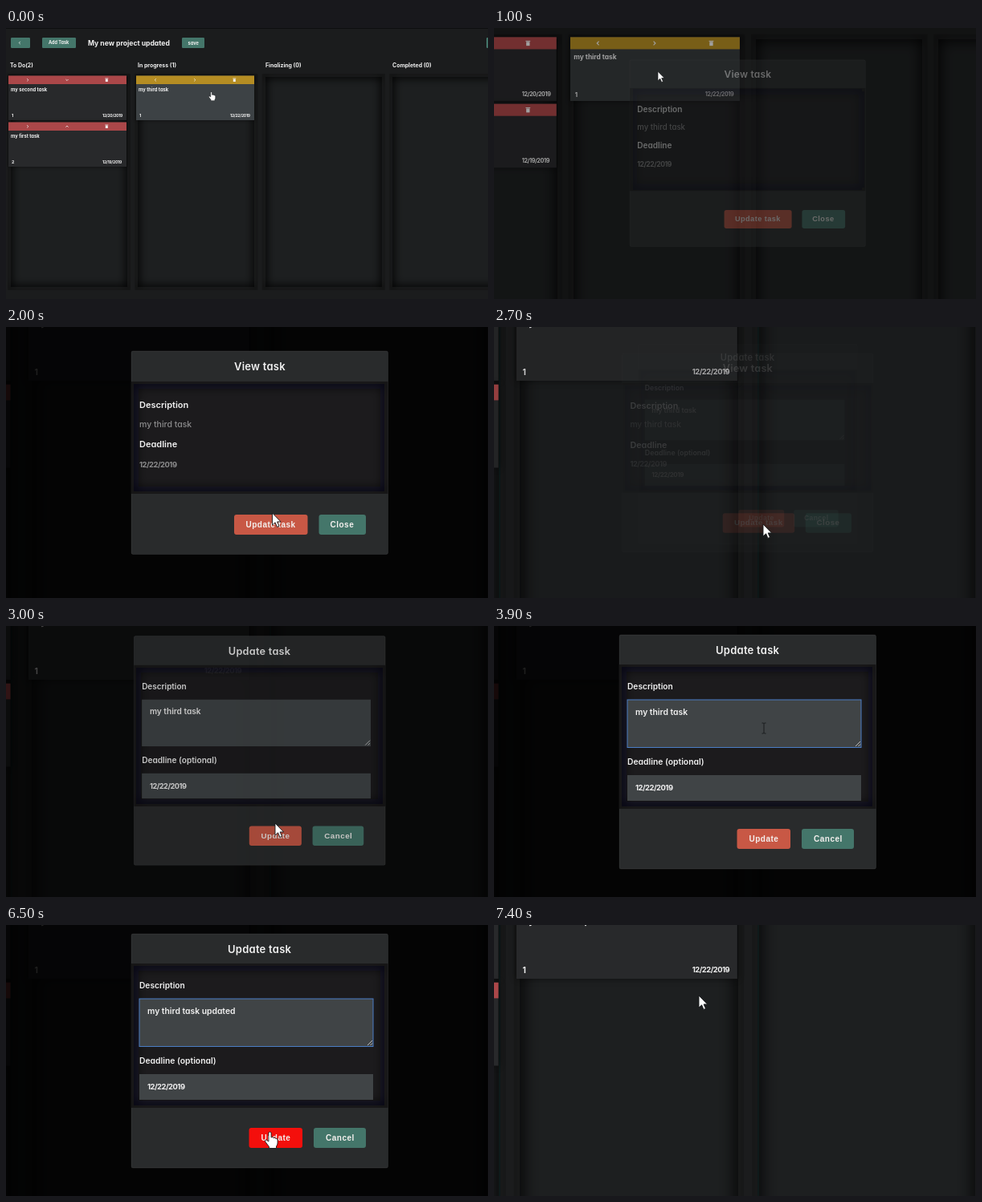
Recreate the animation shown at these times as an HTML page. Size 600 px wide and 338 px high, loop 7500 ms.

```html
<!DOCTYPE html>
<html>
<head>
<meta charset="utf-8">
<style>
html, body { margin: 0; width: 100%; height: 100%; overflow: hidden; background: #1b1c1d; }
svg { display: block; }
text { font-family: Inter, Lato, sans-serif; font-feature-settings: "cv11"; white-space: pre; }
text.btn { font-family: "Liberation Sans", Arial, sans-serif; font-weight: 700; letter-spacing: .5px; }
</style>
</head>
<body>
<svg id="stage" width="600" height="338" viewBox="0 0 600 338"></svg>
<script>
const LOOP = 7500, STEP = 100, ZOOM = 1.87, PAN_X = -275, PAN_Y = -148;
const TEAL = '#44766a', RED = '#c85845', CARD = [40, 41, 43], CARD_HOVER = [61, 66, 69];
const $ = id => document.getElementById(id);

// ---- Drawing helpers (text y is the middle of the capitals) ----
const text = (s, x, y, size, weight = 700, fill = '#f1f1f1', extra = '') =>
  `<text x="${x}" y="${y + size * .36}" font-size="${size}" font-weight="${weight}" fill="${fill}" ${extra}>${s}</text>`;
const rect = (x, y, w, h, fill, extra = '') =>
  `<rect x="${x}" y="${y}" width="${w}" height="${h}" fill="${fill}" ${extra}/>`;
const line = (d, width = 1) =>
  `<path d="${d}" fill="none" stroke="#f1f1f1" stroke-width="${width}"/>`;
const well = (x, y, w, h, fill, shade, blur) =>
  `<svg x="${x}" y="${y}" width="${w}" height="${h}">${rect(0, 0, w, h, fill)}
   ${rect(0, 0, w, h, 'none', `stroke="${shade}" stroke-width="10" filter="url(#${blur})"`)}</svg>`;
const date = (s, x, y, size, fill) => text(s, x, y, size, 700, fill, `letter-spacing="${-size * .052}"`);

const chevron = (x, y, angle) =>
  `<g transform="translate(${x} ${y}) rotate(${angle})">${line('M-.8 -1.6L.8 0L-.8 1.6', .8)}</g>`;
const trash = (x, y) => rect(x - 1.5, y - 1.2, 3, 3.4, '#f1f1f1') + rect(x - 2, y - 2.2, 4, .7, '#f1f1f1');

function card(x, y, color, angles, title, num, day, id) {
  return rect(x, y, 147, 55.5, '#000', 'opacity=".55" filter="url(#soft)"') +
    rect(x, y, 147, 55.5, `rgb(${CARD})`, `id="${id}"`) + rect(x, y, 147, 10.5, color) +
    chevron(x + 24, y + 5.3, angles[0]) + chevron(x + 73, y + 5.3, angles[1]) + trash(x + 122.3, y + 5.3) +
    text(title, x + 3, y + 17, 5.85, 700, '#f1f1f1', `id="${id}Title"`) +
    text(num, x + 4, y + 50, 5.4) + date(day, x + 117, y + 49.3, 5);
}

const smallButton = (x, w) => rect(x, 12, w, 13, TEAL, 'rx="1.2"');
const column = (title, i) =>
  text(title, [5, 164, 323, 481][i], 46.5, 6.95) +
  well(2 + i * 158.4, 57, 153, 270, '#1d1f20', '#0d0e0f', 'inset');

const board = `
  ${rect(-10, -10, 700, 400, '#1b1c1d')}${rect(0, 0, 600, 1, '#0e0f10')}
  ${smallButton(6, 24)}${chevron(17, 18.5, 180)}
  ${smallButton(45, 42)}${text('Add Task', 53, 18.5, 5.5)}
  ${text('My new project updated', 102, 19, 8.6)}
  ${smallButton(219, 28)}${text('save', 226.5, 18.5, 5.6)}
  ${smallButton(598, 30)}
  ${['To Do(2)', 'In progress (1)', 'Finalizing (0)', 'Completed (0)'].map(column).join('')}
  ${card(3, 59.5, '#ab4749', [0, 90], 'my second task', 1, '12/20/2019', 'second')}
  ${card(3, 117.5, '#ab4749', [0, -90], 'my first task', 2, '12/19/2019', 'first')}
  ${card(162, 59.5, '#b58d23', [180, 0], 'my third task', 1, '12/22/2019', 'third')}`;

const button = (s, x, y, w, tx, fill, id = '') =>
  rect(x, y, w, 25, fill, `rx="3" id="${id}"`) + text(s, tx, y + 12, 10, 700, '#f4f0ee', 'class="btn"');

const frame = (top, bodyTop, footTop, bottom) =>
  rect(156, top, 319.5, bottom - top, '#292b2c', 'rx="2" stroke="#fff" stroke-opacity=".07"') +
  well(156, bodyTop, 319.5, footTop - bodyTop, '#1c1b1d', '#111012', 'insetSmall');

const view = frame(30, 68, 208, 283.5) +
  text('View task', 284, 49, 13, 600, '#f1f1f1', 'letter-spacing=".25"') +
  text('Description', 166, 97, 11, 600) + text('my third task', 166, 121, 10.5, 500, '#8c8c8d') +
  text('Deadline', 166, 146.5, 11, 600) + date('12/22/2019', 166, 171.5, 9.4, '#8c8c8d') +
  button('Update task', 284, 234, 91.5, 298.5, RED) + button('Close', 389.5, 234, 58.5, 403.5, TEAL);

const update = frame(11, 48, 228, 303) +
  text('Update task', 276, 30, 13, 600, '#f1f1f1', 'letter-spacing=".25"') +
  text('Description', 166, 75, 10.2, 600) +
  rect(166, 92, 291, 59.5, '#404446', 'id="area"') +
  line('M450 150L456 144M453.5 150L456 147.5', .7) +
  text('', 176, 107, 10.35, 600, '#f1f1f1', 'id="typed"') + rect(0, 100, 1, 14, '#e8e8e8', 'id="caret"') +
  text('Deadline (optional)', 166, 169.5, 10.35, 600) +
  rect(166, 186, 291, 32, '#404446') + date('12/22/2019', 176, 202, 9.4) +
  button('Update', 302.5, 253, 66.5, 317.5, RED, 'confirm') + button('Cancel', 383, 253, 65, 398, TEAL);

const pointer = (id, d, fill = '#fff') =>
  `<path id="${id}" d="${d}" fill="${fill}" stroke="#16181a" stroke-width=".9" stroke-linejoin="round"/>`;

const blur = (id, amount) =>
  `<filter id="${id}" x="-50%" y="-50%" width="200%" height="200%"><feGaussianBlur stdDeviation="${amount}"/></filter>`;

$('stage').innerHTML = `
  <defs>${blur('inset', 6)}${blur('insetSmall', 7)}${blur('soft', 2.2)}</defs>
  <g id="board">${board}</g>
  ${rect(0, 0, 600, 338, '#000', 'id="shade"')}
  <g id="view">${view}</g>
  <g id="update">${update}</g>
  <g id="cursor">
    ${pointer('arrow', 'M0 0V15L3.6 11.8L6 17.4L8.5 16.3L6.1 10.9H10.6Z')}
    ${pointer('hand', 'M-1.6 1Q0 -1 1.6 1V7Q3.2 5.6 4.4 7.4Q6 6.4 7 8.3Q9.5 7.4 9.6 10V14Q9.4 16.5 8 18V20.5H-1V18.5L-5.6 12.5Q-6.6 10 -4.6 9.8L-1.6 12Z')}
    ${pointer('beam', 'M-2.5 0H-.5L0 .6L.5 0H2.5M-2.5 13H-.5L0 12.4L.5 13H2.5M0 .6V12.4', 'none')}
  </g>`;

// ---- Motion ----
const clamp = v => Math.max(0, Math.min(1, v));
const span = (t, a, b) => clamp((t - a) / (b - a));
const easeOut = p => 1 - (1 - p) ** 3;
const smooth = p => p * p * (3 - 2 * p);

// Cursor tip as [time, x, y], in zoomed-in coordinates
const path = [
  [0, 203, 1], [100, 320, -60], [200, 254, -13], [300, 254, -13], [400, 155, -118],
  [500, -148, -54], [600, -20, 22], [700, 170, 19], [1300, 170, 19], [1600, 380, 105],
  [1700, 410, 195], [1800, 412, 236], [1900, 350, 238], [2000, 331.5, 232], [2200, 331.5, 232],
  [2400, 335, 246], [3000, 335, 246], [3400, 345, 260], [3700, 345, 260], [3800, 342, 195],
  [3900, 336, 121], [5700, 336, 121], [6100, 340, 215], [6300, 328.5, 258],
  [6800, 328.5, 258], [7300, 258, 92], [7400, 255, 88]
];
const shapes = [[0, 'hand'], [100, 'arrow'], [200, 'hand'], [500, 'arrow'], [700, 'hand'], [900, 'arrow'],
  [3900, 'beam'], [5900, 'arrow'], [6200, 'hand'], [6800, 'arrow']];
const keys = [4200, 4600, 4800, 4900, 5000, 5200, 5400, 5600];

function cursorAt(t) {
  const i = path.findLastIndex(k => k[0] <= t), a = path[i], b = path[i + 1] || a;
  const p = a === b ? 0 : span(t, a[0], b[0]);
  return [a[1] + (b[1] - a[1]) * p, a[2] + (b[2] - a[2]) * p];
}

// Opacity and scale of a dialog that opens at `start` and has closed by `end`
function dialog(id, t, start, leave, end, pivotY) {
  const enter = easeOut(span(t, start, start + 700)), exit = span(t, leave, end);
  const alpha = enter ** 1.8 * (1 - exit), scale = .8 + .2 * enter - .027 * exit;
  const y = exit ? 156 : pivotY;
  $(id).setAttribute('opacity', alpha);
  $(id).setAttribute('transform', `translate(315.5 ${y}) scale(${scale}) translate(-315.5 ${-y})`);
  return alpha;
}

function draw(t) {
  const p = smooth(span(t, 800, 1200)), k = 1 + (ZOOM - 1) * p, panX = PAN_X * p, panY = PAN_Y * p;
  $('board').setAttribute('transform', `translate(${panX} ${panY}) scale(${k})`);

  const hover = t < 500 ? 1 : span(t, 600, 700) * (1 - span(t, 900, 1200));
  $('third').setAttribute('fill', `rgb(${CARD.map((c, i) => Math.round(c + (CARD_HOVER[i] - c) * hover))})`);
  $('thirdTitle').textContent = t >= 6600 ? 'my third task updated' : 'my third task';

  const dim = Math.max(dialog('view', t, 820, 2150, 2800, 150), dialog('update', t, 2630, 6700, 7400, 82));
  $('shade').setAttribute('opacity', .87 * dim);

  const typed = $('typed');
  typed.textContent = 'my third task' + ' updated'.slice(0, keys.filter(k => k <= t).length);
  $('caret').setAttribute('x', 176 + typed.getComputedTextLength());
  $('caret').setAttribute('opacity', t >= 4000 && t < 5800 ? 1 : 0);
  $('area').setAttribute('stroke', t >= 3800 ? '#4a7dc6' : 'none');
  $('confirm').setAttribute('fill', t >= 6200 ? '#f40f0c' : RED);

  const [x, y] = cursorAt(t), s = k / ZOOM;
  $('cursor').setAttribute('transform',
    `translate(${panX + s * (x - PAN_X)} ${panY + s * (y - PAN_Y)}) scale(${s})`);
  const shape = shapes.findLast(k => k[0] <= t)[1];
  for (const id of ['arrow', 'hand', 'beam']) $(id).setAttribute('visibility', id === shape ? 'visible' : 'hidden');
}

const begin = performance.now();
function tick() {
  const t = (performance.now() - begin) % LOOP;
  draw(Math.floor(t / STEP) * STEP);
  requestAnimationFrame(tick);
}
tick();
</script>
</body>
</html>
```
